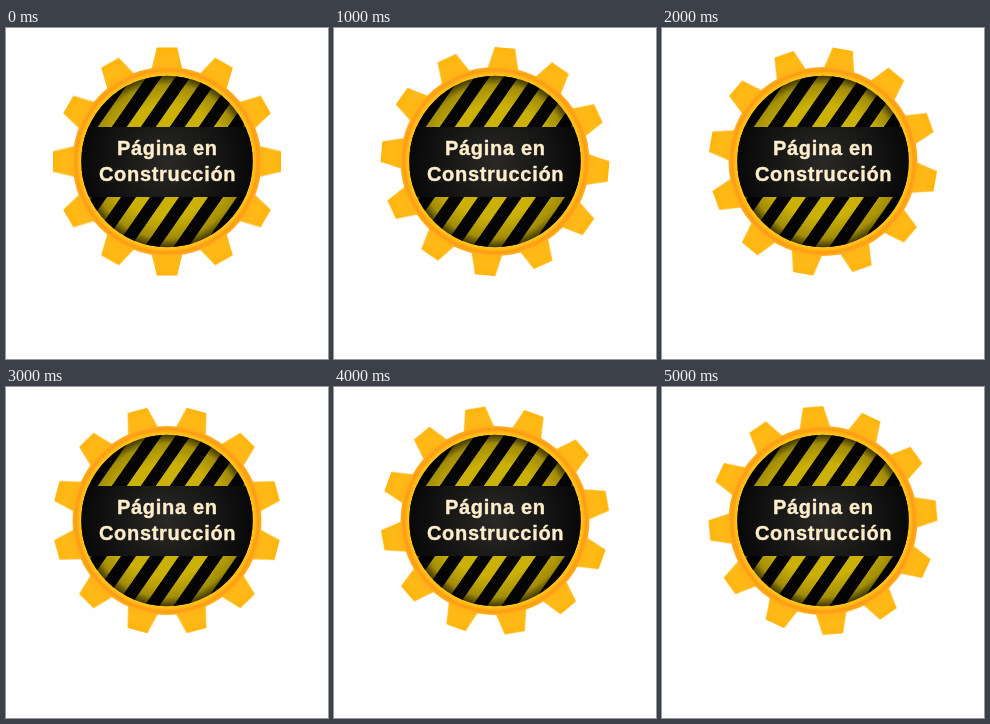
An HTML page for the animation above (6 s loop, 322 by 331 pixels).

```html
<!DOCTYPE html>
<html lang="es">
<head>
<meta charset="utf-8">
<title>Página en Construcción</title>
<style>
  html, body { margin: 0; width: 100%; height: 100%; overflow: hidden; background: #fff; }
  svg { display: block; width: 322px; height: 331px; }
  #gear { animation: turn 6s steps(6, end) infinite; }
  /* One tooth pitch per loop */
  @keyframes turn { to { transform: rotate(30deg); } }
  text {
    font: bold 20px "Liberation Sans", Arial, sans-serif;
    letter-spacing: .7px;
    text-anchor: middle;
    fill: #ffeecb;
    stroke: #ffeecb;
    stroke-width: .4;
    stroke-linejoin: round;
  }
</style>
</head>
<body>
<svg viewBox="0 0 322 331">
  <defs>
    <radialGradient id="metal" gradientUnits="userSpaceOnUse" cx="0" cy="0" r="114">
      <stop offset=".82" stop-color="#ffb512"/>
      <stop offset=".91" stop-color="#ffba18"/>
      <stop offset="1" stop-color="#ffb40a"/>
    </radialGradient>
    <radialGradient id="rim" gradientUnits="userSpaceOnUse" cx="0" cy="0" r="94.5">
      <stop offset=".91" stop-color="#ffc61c"/>
      <stop offset=".935" stop-color="#ffb718"/>
      <stop offset=".96" stop-color="#ff9d10"/>
      <stop offset=".98" stop-color="#ffa318"/>
      <stop offset="1" stop-color="#ffb424"/>
    </radialGradient>
    <radialGradient id="shade">
      <stop offset=".65" stop-color="#000" stop-opacity="0"/>
      <stop offset=".88" stop-color="#000" stop-opacity=".2"/>
      <stop offset="1" stop-color="#000" stop-opacity=".75"/>
    </radialGradient>
    <radialGradient id="panel" gradientUnits="userSpaceOnUse" cx="0" cy="0" r="86">
      <stop offset="0" stop-color="#2a2928"/>
      <stop offset=".45" stop-color="#1a1a19"/>
      <stop offset="1" stop-color="#080808"/>
    </radialGradient>
    <pattern id="stripes" width="29" height="240" patternUnits="userSpaceOnUse"
             patternTransform="translate(-40.3 -34.5) skewX(-34.8)">
      <rect width="29" height="240" fill="#050503"/>
      <rect width="14" height="240" fill="#cbb006"/>
    </pattern>
    <clipPath id="disc"><circle r="85.7"/></clipPath>
  </defs>

  <g transform="translate(161 133.5)">
    <g id="gear" fill="url(#metal)"></g>
    <circle r="94.5" fill="url(#rim)"/>
    <g clip-path="url(#disc)">
      <rect x="-90" y="-90" width="180" height="180" fill="url(#stripes)"/>
      <circle r="87" fill="url(#shade)"/>
      <rect x="-90" y="-34.5" width="180" height="70" fill="url(#panel)"/>
    </g>
  </g>
  <text x="161.4" y="127">Página en</text>
  <text x="161.6" y="152.5">Construcción</text>
</svg>
<script>
  const gear = document.getElementById('gear');
  for (let angle = 0; angle < 360; angle += 30) {
    const tooth = document.createElementNS('http://www.w3.org/2000/svg', 'path');
    tooth.setAttribute('d', 'M-16-90L-10.2-114H10.2L16-90Z');
    tooth.setAttribute('transform', `rotate(${angle})`);
    gear.append(tooth);
  }
</script>
</body>
</html>
```
